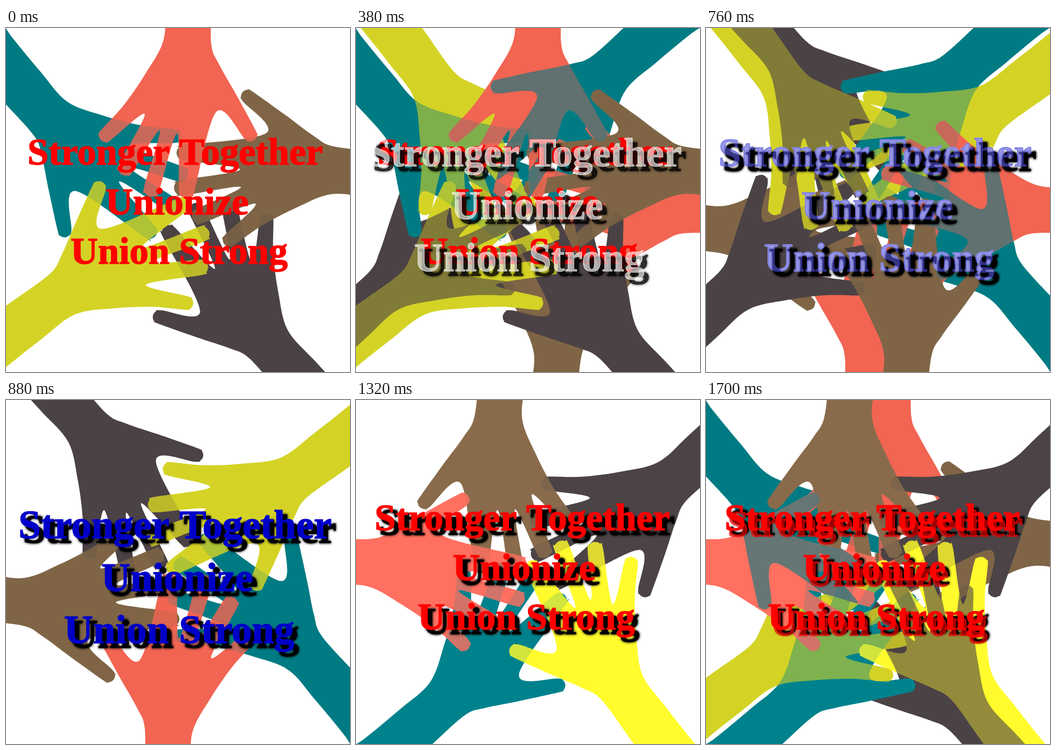
Write an HTML page with a canvas that moves like this. It is 600 px wide and 600 px high and loops after 1760 ms.

```html
<!DOCTYPE html>
<html lang="en">
<head>
<meta charset="utf-8">
<title>Stronger Together</title>
<style>
  html, body { margin: 0; width: 100%; height: 100%; overflow: hidden; background: #fff; }
  canvas { display: block; width: 600px; height: 600px; }
</style>
</head>
<body>
<canvas id="stage" width="600" height="600"></canvas>
<script>
const ctx = document.getElementById('stage').getContext('2d');
const RAD = Math.PI / 180;

// Closed Catmull-Rom curve through points.
function smooth(points) {
  const at = i => points.at(i % points.length);
  const path = new Path2D();
  path.moveTo(...at(0));
  points.forEach((b, i) => {
    const a = at(i - 1), c = at(i + 1), d = at(i + 2);
    path.bezierCurveTo(
      b[0] + (c[0] - a[0]) / 6, b[1] + (c[1] - a[1]) / 6,
      c[0] - (d[0] - b[0]) / 6, c[1] - (d[1] - b[1]) / 6, c[0], c[1]);
  });
  path.closePath();
  return path;
}

// One hand, pointing down: two arm edges, fingertip centres and the gaps between them.
function makeHand() {
  const left = [[268, -220], [274, -130], [276, -50], [275, 20], [243, 80], [205, 135]];
  const right = [[402, 117], [372, 64], [358, 28], [359, -50], [362, -130], [368, -220]];
  const tips = [[174, 187], [209, 244], [254, 281], [315, 284], [426, 186]];
  const gaps = [left.at(-1), [242, 150], [268, 179], [298, 184], [367, 146], right[0]];
  const outline = [...left];
  tips.forEach(([x, y], i) => {
    const [a, b] = [gaps[i], gaps[i + 1]];
    const aim = Math.atan2(y - (a[1] + b[1]) / 2, x - (a[0] + b[0]) / 2);
    const r = i % 4 ? 13.5 : 12;
    for (let turn = 90; turn >= -90; turn -= 45) {
      const angle = aim + turn * RAD;
      outline.push([x + r * Math.cos(angle), y + r * Math.sin(angle)]);
    }
    if (i < 4) outline.push(b);
  });
  return smooth([...outline, ...right]);
}
const hand = makeHand();

// Listed from bottom to top.
const places = {
  teal: { x: 200.5, y: 275, angle: -41, flip: -1 },
  dark: { x: 357.5, y: 416, angle: 138, flip: 1 },
  brown: { x: 401, y: 243.5, angle: 97, flip: -1 },
  yellow: { x: 242, y: 376, angle: -127, flip: 1 },
  red: { x: 300.5, y: 191.5, angle: 0, flip: 1 }
};
const names = Object.keys(places);

const plain = { teal: '#007b83', dark: '#4b4245', brown: '#7f6546', yellow: '#d4d325', red: '#f16552' };
const bright = { teal: '#00828c', dark: '#4b4345', brown: '#896b4b', yellow: '#fffb2d', red: '#ff7060' };
const lines = ['Stronger Together', 'Unionize', 'Union Strong'];

// Each scene is the same ring of hands, a quarter turn further on.
const scenes = [
  { turn: 0, paint: plain, ink: '#f00', size: 66, dx: 0, base: 238, gap: 86.5, shadow: false },
  { turn: 1, paint: plain, ink: '#fff', size: 70, dx: 0, base: 241, gap: 91.5, shadow: true },
  { turn: 2, paint: plain, ink: '#0000c8', size: 70, dx: 0, base: 241, gap: 91.5, shadow: true },
  { turn: 3, paint: bright, ink: '#f00', size: 66, dx: -5, base: 227, gap: 86.5, shadow: true }
];

function place(scene, name) {
  const { x, y, angle, flip } = places[name];
  ctx.setTransform(1, 0, 0, 1, 300, 300);
  ctx.rotate(scene.turn * 90 * RAD);
  ctx.translate(x - 300, y - 300);
  ctx.rotate(angle * RAD);
  ctx.scale(flip, 1);
  ctx.translate(-300.5, -191.5);
}

function fillHand(scene, name, alpha = 1) {
  ctx.save();
  place(scene, name);
  ctx.globalAlpha = alpha;
  ctx.fillStyle = scene.paint[name];
  ctx.fill(hand);
  ctx.restore();
}

// While scenes change only these colours mix; otherwise the old hand covers the new.
const mixes = { red: 'teal', teal: 'yellow', yellow: 'dark' };

function drawHands(scene, next, mix) {
  names.forEach((name, i) => {
    fillHand(scene, name);
    ctx.save();
    place(scene, name);
    ctx.clip(hand);
    names.slice(0, i).forEach(below => fillHand(scene, below, 0.18));
    const solid = name === 'yellow' && scene.turn === 2;
    if (next && mixes[name] && !solid) fillHand(next, mixes[name], mix);
    ctx.restore();
  });
}

function drawText(scene, alpha = 1) {
  ctx.save();
  ctx.setTransform(1, 0, 0, 1, 0, 0);
  ctx.globalAlpha = alpha;
  ctx.font = `bold ${scene.size}px "Liberation Serif", "Times New Roman", serif`;
  ctx.textAlign = 'center';
  ctx.lineJoin = 'round';
  ctx.lineWidth = 1.5;
  const write = (color, shift) => {
    ctx.fillStyle = ctx.strokeStyle = color;
    lines.forEach((line, i) => {
      const x = 295 + scene.dx + i * 3.5 + shift;
      const y = scene.base + i * scene.gap + shift;
      ctx.fillText(line, x, y);
      ctx.strokeText(line, x, y);
    });
  };
  if (scene.shadow) {
    ctx.shadowColor = '#000';
    ctx.shadowBlur = 4;
    write('#000', 8);
    ctx.shadowColor = 'transparent';
  }
  write(scene.ink, 0);
  ctx.restore();
}

function drawChange(from, to, step) {
  const shown = step > 2;
  if (shown) drawHands(to);
  drawHands(from, to, shown ? 0.6 : 0.4);
  drawText(from);
  // A faint new text shows only where something is already painted.
  if (!shown) ctx.globalCompositeOperation = 'source-atop';
  drawText(to, (step - 1) / 5);
  ctx.globalCompositeOperation = 'source-over';
}

const HOLD = 200, STEP = 60, PART = 440;

function draw(now) {
  const index = Math.floor(now / PART) % 4;
  const rest = now % PART;
  const step = rest < HOLD ? 0 : Math.floor((rest - HOLD) / STEP) + 1;
  const from = scenes[index];
  ctx.clearRect(0, 0, 600, 600);
  if (step < 2) {
    drawHands(from);
    drawText(from);
  } else {
    drawChange(from, scenes[(index + 1) % 4], step);
  }
}

let start;
function tick(now) {
  start ??= now;
  draw(now - start);
  requestAnimationFrame(tick);
}
draw(0);
requestAnimationFrame(tick);
</script>
</body>
</html>
```
